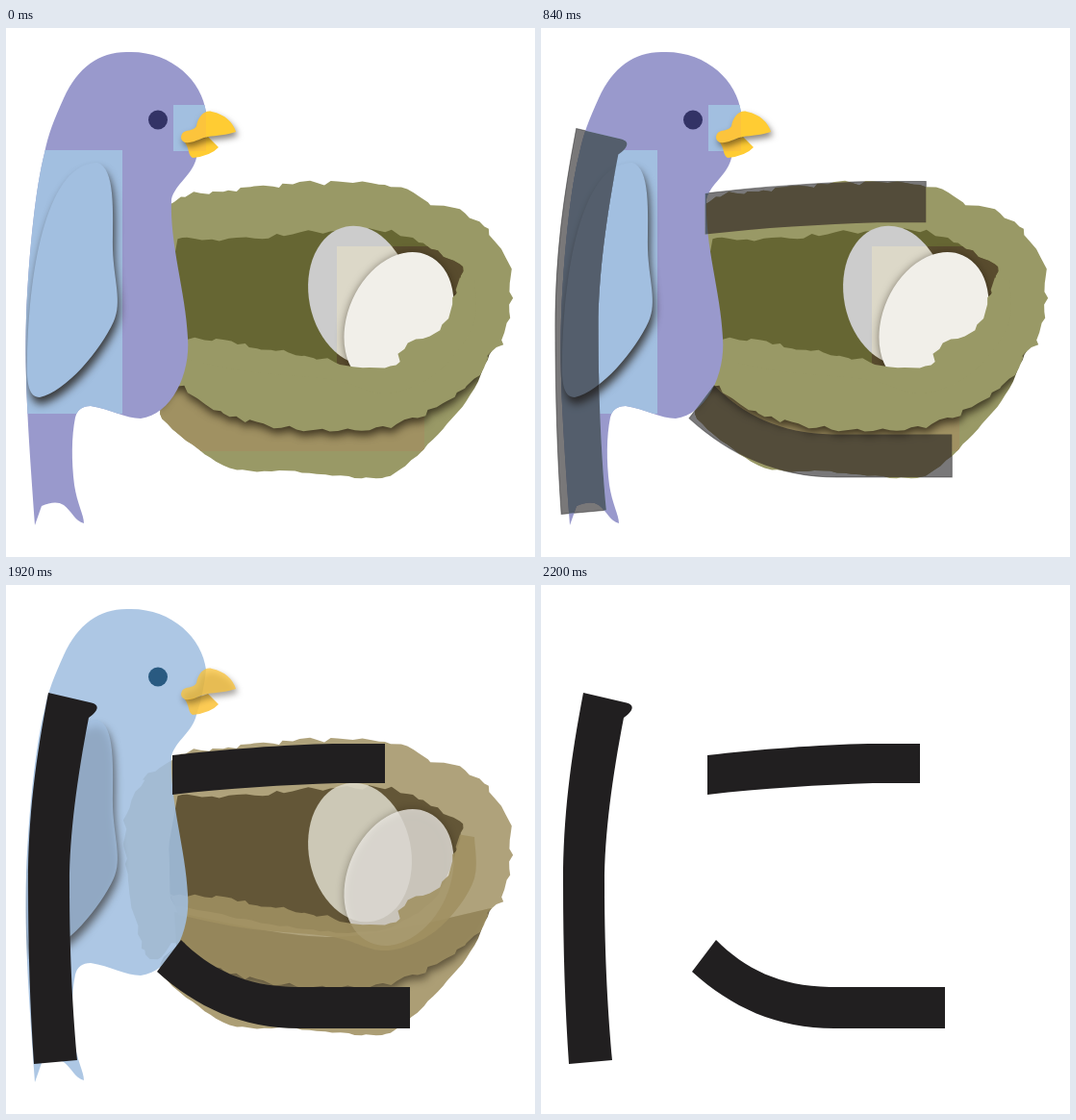
An HTML page with a canvas for the animation above (3 s loop, 550x550 px).

```html
<!DOCTYPE html>
<html lang="ja">
<head>
<meta charset="utf-8">
<title>に</title>
<style>
  html, body { margin: 0; width: 100%; height: 100%; overflow: hidden; background: #fff; }
  canvas { display: block; }
</style>
</head>
<body>
<canvas id="stage" width="550" height="550"></canvas>
<script>
const ctx = document.getElementById('stage').getContext('2d');
const LOOP = 3000, STEP = 40;

let seed = 7;
function random() {
  seed = (seed * 16807) % 2147483647;
  return seed / 2147483647;
}

// A spline through a few points, torn by random offsets of the given size.
function edge(points, tear = 0) {
  const out = [], at = i => points[Math.min(points.length - 1, Math.max(0, i))];
  for (let i = 0; i < points.length - 1; i++) {
    const [a, b, c, d] = [at(i - 1), at(i), at(i + 1), at(i + 2)];
    const count = Math.ceil(Math.hypot(c[0] - b[0], c[1] - b[1]) / 8);
    for (let k = 0; k < count; k++) {
      const t = k / count;
      out.push([0, 1].map(n =>
        b[n] + t / 2 * (c[n] - a[n]
          + t * (2 * a[n] - 5 * b[n] + 4 * c[n] - d[n]
          + t * (3 * (b[n] - c[n]) + d[n] - a[n])))
        + (random() - .5) * tear));
    }
  }
  return out;
}

const shape = (...edges) => new Path2D('M' + edges.flat(2).join(' ') + 'Z');
const rect = (x, y, w, h) => { const p = new Path2D(); p.rect(x, y, w, h); return p; };
const oval = (x, y, rx, ry, turn = 0) => {
  const p = new Path2D();
  p.ellipse(x, y, rx, ry, turn, 0, Math.PI * 2);
  return p;
};

// Nest
const rim = shape(
  edge([[145, 200], [180, 177], [217, 170], [268, 165], [330, 161], [400, 164], [450, 185],
    [490, 199], [521, 245], [526, 285], [516, 328], [505, 336]], 6),
  edge([[505, 336], [480, 371], [440, 398], [385, 417], [330, 418], [270, 413], [215, 396],
    [180, 372], [150, 390], [128, 320], [124, 240], [145, 200]], 5));
const body = shape(
  edge([[175, 340], [340, 366], [505, 336]]),
  edge([[505, 336], [482, 382], [435, 438], [400, 465], [375, 468], [300, 461], [240, 459],
    [200, 438], [160, 401], [180, 372]], 2));
const hollow = shape(
  edge([[179, 220], [250, 219], [320, 212], [400, 212], [440, 229], [476, 248]], 5),
  edge([[476, 248], [462, 295], [430, 340], [355, 362], [200, 338], [172, 325], [170, 262]], 2));
const lip = shape(
  edge([[172, 323], [220, 324], [260, 331], [300, 339], [340, 347], [400, 354], [414, 333],
    [455, 309], [470, 270], [476, 258]], 5),
  edge([[487, 262], [487, 305], [462, 345], [430, 370], [390, 380], [340, 366], [250, 357],
    [175, 342]]));
const backEgg = oval(368, 278, 53, 73, -.2);
const frontEgg = oval(408.5, 304, 53, 74, .42);

// Bird
const bird = new Path2D(`M128 25C98 24 75 40 60 73C50 95 44 110 40 130C31 165 24 230 21 300
  C19 370 24 430 30 517L37 497C46 493 54 492 60 496C68 502 72 513 81 515
  C81 506 74 495 71 475C68 450 68 425 72 405Q75 393 88 393C108 396 125 406 140 406
  C172 402 192 360 189 322C187 275 170 225 172 178C176 162 194 153 198 135
  Q206 110 208 88C204 55 172 24 128 25Z`);
const wing = new Path2D(`M22 345C24 240 45 140 95 140C114 146 111 190 111 230
  C112 262 121 285 112 305C98 336 62 378 35 384C24 384 21 370 22 345Z`);
const eye = oval(158, 95.5, 10, 10);
const beakTop = new Path2D(`M183 110C186 105 195 108 198 102C200 90 208 85 214 87
  C228 90 236 98 239 108C230 111 218 112 210 113C200 115 195 120 186 119Q180 116 183 110Z`);
const beakLow = new Path2D('M186 119Q200 117 210 113Q216 119 221 124Q213 133 194 135C189 132 191 126 186 119Z');

const glyph = new Path2D(`M44 112L89 122.500C98 125 96 131 86 138C74 200 66 260 66 310
  C66 390 70 450 74 494L29 498C25 440 23 380 23 310C23 240 31 180 44 112Z
  M173 177C225 171 290 166 340 165H394V206H345C290 208 230 211 173 218Z
  M182 369C212 399 248 417 300 418H420V461H305C245 461 198 439 157 402Z`);

const FLAT = {
  bird: '#9999cc', eye: '#333366', beak: '#ffcc33',
  nest: '#999966', hollow: '#666633', backEgg: '#cccccc', frontEgg: '#f5f4f3'
};
const SOFT = {
  bird: '#a2bfe0', eye: '#164a72', beak: '#fcc43c',
  nest: '#a09162', hollow: '#594c2e', backEgg: '#dcd8c8', frontEgg: '#f1efe9'
};

function fill(path, color, alpha) {
  ctx.globalAlpha = alpha;
  ctx.fillStyle = color;
  ctx.fill(path);
}

// Casts only the shadow of a path, kept inside an area.
function shade(path, area, dx, dy, blur, alpha) {
  ctx.save();
  ctx.clip(area);
  ctx.globalAlpha = alpha;
  ctx.shadowColor = '#1a1208';
  ctx.shadowBlur = blur;
  ctx.shadowOffsetX = 1000 + dx;
  ctx.shadowOffsetY = dy;
  ctx.translate(-1000, 0);
  ctx.fillStyle = '#000';
  ctx.fill(path);
  ctx.restore();
}

// Back to front; "soft" lists the areas that show the soft colours at rest.
const layers = [
  {
    soft: [rect(150, 340, 285, 100)],
    draw(colors, a) {
      fill(body, colors.nest, a);
      shade(rim, body, 1, 5, 8, .7 * a * a);
    }
  },
  { soft: [], draw: (colors, a) => fill(rim, colors.nest, a ** 1.3) },
  {
    soft: [rect(344, 227, 140, 140)],
    draw(colors, a) {
      fill(hollow, colors.hollow, a);
      fill(backEgg, colors.backEgg, a);
      shade(frontEgg, hollow, 0, 1, 8, .5 * a * a);
      fill(frontEgg, colors.frontEgg, a * a);
    }
  },
  { soft: [], draw: (colors, a) => fill(lip, colors.nest, a) },
  {
    soft: [rect(17, 127, 104, 274), rect(174, 80, 34, 48)],
    draw(colors, a) {
      fill(bird, colors.bird, a);
      shade(wing, bird, 2, 7, 8, .75 * a * a);
      fill(wing, colors.bird, a * a);
      fill(eye, colors.eye, a);
      fill(beakLow, colors.beak, a);
      shade(beakTop, rect(170, 75, 80, 70), 2, 4, 6, .5 * a * a);
      fill(beakTop, colors.beak, a * a);
    }
  }
];

const drawSoft = alpha => layers.forEach(layer => layer.draw(SOFT, alpha));

function drawResting() {
  for (const { soft, draw } of layers) {
    draw(FLAT, 1);
    soft.forEach(area => within(area, () => draw(SOFT, 1)));
  }
}

function zoom(scale) {
  ctx.translate(232, 305);
  ctx.scale(scale, scale);
  ctx.translate(-232, -305);
}

function within(area, draw, scale = 1) {
  ctx.save();
  zoom(scale);
  ctx.clip(area);
  ctx.setTransform(1, 0, 0, 1, 0, 0);
  draw();
  ctx.restore();
}

function drawGlyph(scale, paint) {
  ctx.save();
  zoom(scale);
  paint();
  ctx.restore();
}

const progress = (t, start, steps) =>
  Math.min(1, Math.max(0, Math.floor((t - start) / STEP + 1) / steps));

function render(t) {
  const shown = progress(t, 640, 10);
  const faded = progress(t, 1920, 8);
  const scale = 1 + .097 * (1 - shown);
  const arriving = shown > 0 && shown < 1;

  fill(rect(0, 0, 550, 550), '#fff', 1);

  if (arriving) {
    drawGlyph(scale, () => {
      ctx.globalAlpha = 1 - shown;
      ctx.strokeStyle = '#000';
      ctx.stroke(glyph);
    });
  }

  if (faded === 0) drawResting();
  else if (faded < 1) drawSoft(1 - faded);

  if (arriving) within(glyph, () => drawSoft(1), scale);
  if (shown > 0) drawGlyph(scale, () => fill(glyph, '#211f20', shown));
}

const start = performance.now();
function tick() {
  render((performance.now() - start) % LOOP);
  requestAnimationFrame(tick);
}
tick();
</script>
</body>
</html>
```
